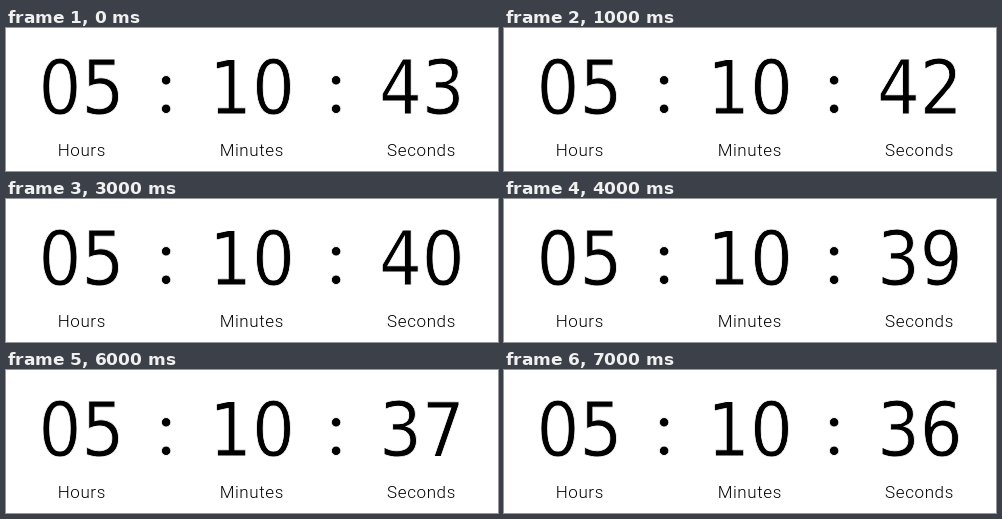
Recreate the animation shown at these times as an HTML page. Size 492 by 143 pixels, loop 8000 ms.

```html
<!DOCTYPE html>
<html lang="en">
<head>
<meta charset="utf-8">
<title>Countdown</title>
<style>
  html, body { margin: 0; width: 100%; height: 100%; overflow: hidden; background: #fff; }
  svg { display: block; }
  text { text-anchor: middle; fill: #000; }
  /* the white outline thins the strokes a little */
  .digits { font: 75px "DejaVu Sans Condensed", "Noto Sans", sans-serif; stroke: #fff; stroke-width: .8px; }
  .colon { font-family: Lato, sans-serif; }
  .label { font: 300 17px Roboto, sans-serif; letter-spacing: .6px; }
</style>
</head>
<body>
<svg width="492" height="143" viewBox="0 0 492 143">
  <g class="digits">
    <text x="75.5" y="85.5">05</text>
    <text x="160" y="85" class="colon">:</text>
    <text x="246" y="85.5">10</text>
    <text x="330" y="85" class="colon">:</text>
    <text x="415.8" y="85.5" id="seconds">43</text>
  </g>
  <text class="label" x="75.8" y="127.5">Hours</text>
  <text class="label" x="245.8" y="127.5">Minutes</text>
  <text class="label" x="415.5" y="127.5">Seconds</text>
</svg>
<script>
  const LOOP = 8000, FIRST_SECOND = 43;
  const seconds = document.getElementById('seconds');
  const start = performance.now();

  function draw() {
    const elapsed = (performance.now() - start) % LOOP;
    seconds.textContent = FIRST_SECOND - Math.floor(elapsed / 1000);
    requestAnimationFrame(draw);
  }
  draw();
</script>
</body>
</html>
```
